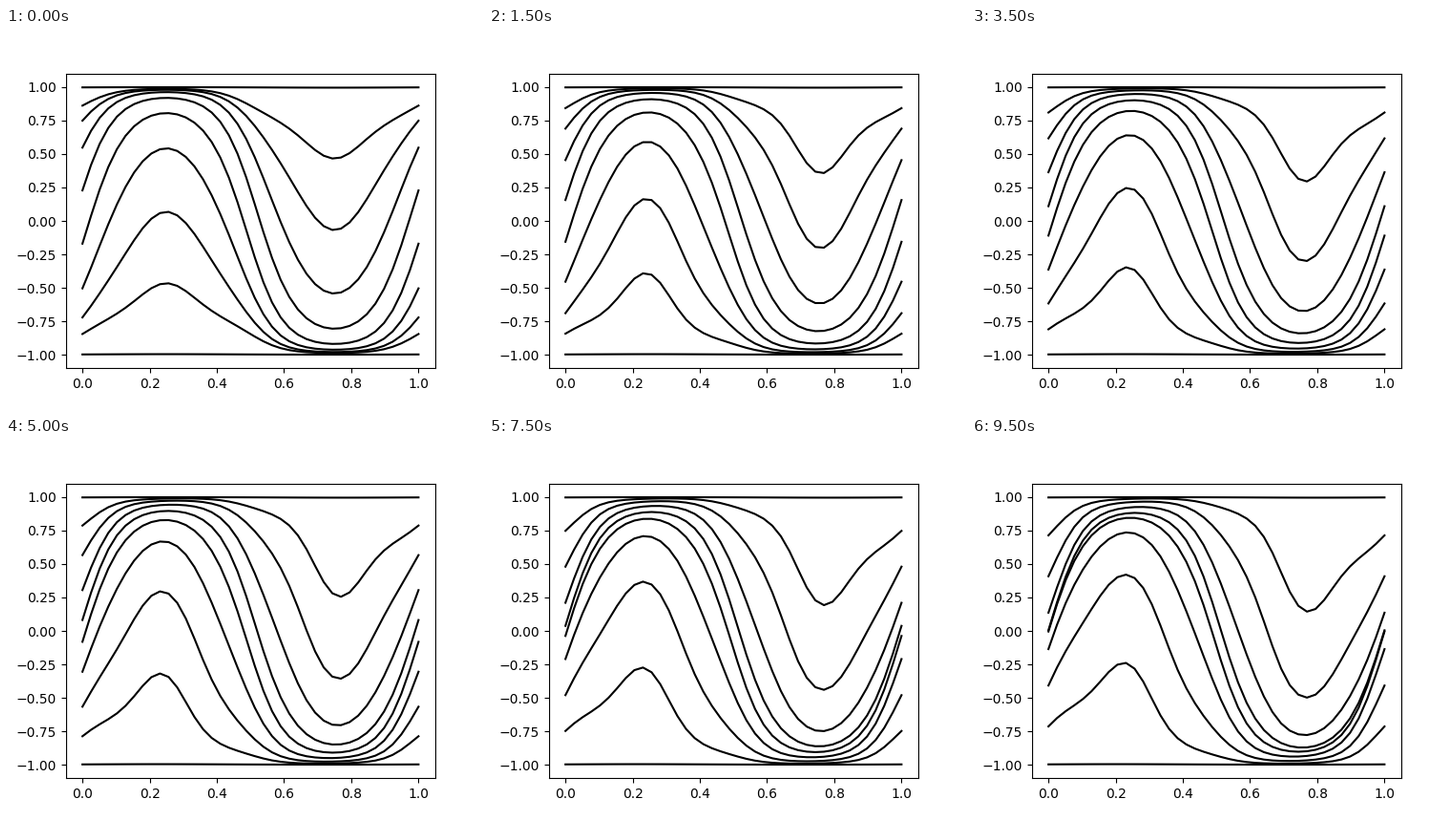
A matplotlib script that plays this animation: 500 px wide and 400 px high, repeating every 10 s.

```python
import numpy as np
import matplotlib.pyplot as plt
from matplotlib.animation import FuncAnimation

FRAMES, INTERVAL = 20, 500
SETTLE, LAST = 1.5, 9.5   # seconds: end of the quick change, last picture

x = np.linspace(0, 1, 40)
theta = 2 * np.pi * x
sin, cos, cos2 = np.sin(theta), np.cos(theta), np.cos(2 * theta)
flanks = (1 - np.cos(4 * theta)) / 2


def blend(begin, settled, final, fast, slow):
    return begin + (settled - begin) * fast + (final - settled) * slow


def inner_curve(v, fast, slow):
    """Curve of signed rank v, as harmonics squashed by tanh."""
    def mix(begin, settled, final):
        return blend(begin, settled, final, fast, slow)

    level = v * (mix(.44, .37, .09) + mix(-.014, .012, .082) * abs(v))
    swing = mix(1.35, 1.345, 1.36) - mix(.031, .021, .018) * v**2
    lean = mix(0, -.05, -.11) * v
    bulge = mix(-.03, -.012, -.012) * v
    drift = mix(.03, 0, 0) * cos**2 - mix(0, .02, .05) * sin**2
    sharp = mix(.5, 1, 1) * (.037 * v * flanks
                             - .02 * abs(v) * (sin + np.sin(3 * theta)))
    return np.tanh(level + swing * sin + lean * cos + bulge * cos2
                   + drift + sharp)


def edge_curve(side, slow):
    return np.tanh(3.1 * side + .2 * np.sin(theta - .3 * side * slow))


fig, ax = plt.subplots(figsize=(5, 4), dpi=100)
ax.set_xlim(-.05, 1.05)
ax.set_ylim(-1.097, 1.097)
lines = [ax.plot([], [], color="black", lw=1.5)[0] for _ in range(10)]


def update(i):
    t = i * INTERVAL / 1000
    fast = 1 - (1 - min(t / SETTLE, 1)) ** 1.5
    slow = max((t - SETTLE) / (LAST - SETTLE), 0) ** .85
    for k, line in enumerate(lines):
        v = k - 4.5
        if abs(v) == 4.5:
            y = edge_curve(np.sign(v), slow)
        else:
            y = inner_curve(v, fast, slow)
        line.set_data(x, y)
    return lines


anim = FuncAnimation(fig, update, frames=FRAMES, interval=INTERVAL,
                     repeat=True, repeat_delay=0)
plt.show()
```
